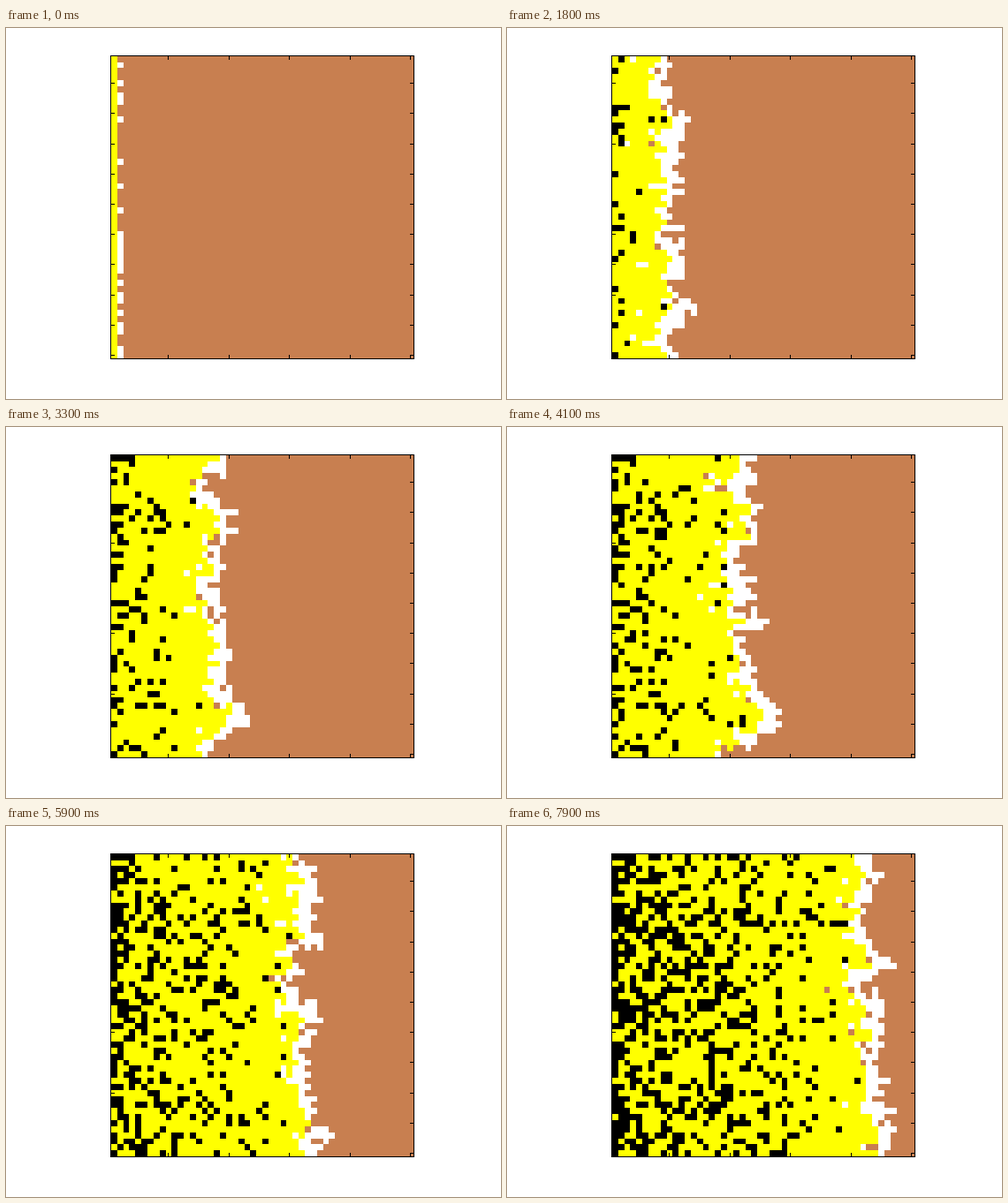
These frames come from a looping animation (560x420 px, 8 s). A matplotlib script:

```python
import numpy as np
import matplotlib.pyplot as plt
from matplotlib.animation import FuncAnimation

W, H, DPI = 560, 420, 100
N, FRAMES, STEP = 50, 80, 100
LEFT, TOP, CELL = 118.4, 31.25, 0.815 * H / N
BOX_X, BOX_Y, BOX = 118, 31, 344  # frame corner and outer size, in pixels
TICK = 5

SPREAD = 0.36   # chance that a cell next to the front catches on
DELAY = 5       # frames spent white
DECAY = 0.009   # chance per frame that a yellow cell turns black

COLOURS = np.array([[200, 127, 80], [255, 255, 255],
                    [255, 255, 0], [0, 0, 0]], dtype=np.uint8)


def touches(mask):
    """Cells with at least one marked neighbour above, below or beside."""
    m = np.pad(mask, 1)
    return m[:-2, 1:-1] | m[2:, 1:-1] | m[1:-1, :-2] | m[1:-1, 2:]


def grow(rng):
    """Frames at which each cell turns white, yellow and black."""
    white = np.full((N, N), np.inf)
    white[:, 0] = -DELAY
    for t in range(FRAMES):
        reached = np.isfinite(white)
        caught = touches(reached) & ~reached & (rng.random((N, N)) < SPREAD)
        white[caught] = t
    yellow = white + DELAY
    decay = DECAY * (1 + np.exp(-np.arange(N)))  # faster by the left edge
    return white, yellow, yellow + rng.geometric(decay, (N, N))


def cell_index(start, first):
    pixels = np.arange(first, first + BOX)
    return np.clip(np.floor((pixels - start) / CELL).astype(int), 0, N - 1)


def tick_pixels(start, every):
    marks = np.arange(every, N + 1, every)
    return np.round(start + (marks - 0.5) * CELL).astype(int)


def outline():
    """Mask of the frame and its inward ticks."""
    ink = np.zeros((BOX, BOX), dtype=bool)
    ink[[0, -1], :] = ink[:, [0, -1]] = True
    xs = tick_pixels(LEFT, 10) - BOX_X
    ys = tick_pixels(TOP, 5) - BOX_Y
    for end in (slice(0, TICK), slice(-TICK, None)):
        ink[end, xs] = True
        ink[ys, end] = True
    return ink


stages = grow(np.random.default_rng(12))
lookup = np.ix_(cell_index(TOP, BOX_Y), cell_index(LEFT, BOX_X))
ink = outline()


def picture(t):
    state = sum((t >= s).astype(int) for s in stages)
    box = COLOURS[state[lookup]]
    box[ink] = 0
    stage = np.full((H, W, 3), 255, dtype=np.uint8)
    stage[BOX_Y:BOX_Y + BOX, BOX_X:BOX_X + BOX] = box
    return stage


fig = plt.figure(figsize=(W / DPI, H / DPI), dpi=DPI, facecolor="white")
image = fig.figimage(picture(0), origin="upper")


def update(t):
    image.set_data(picture(t))
    return [image]


anim = FuncAnimation(fig, update, frames=FRAMES, interval=STEP,
                     repeat=True, repeat_delay=0, blit=False)
plt.show()
```
